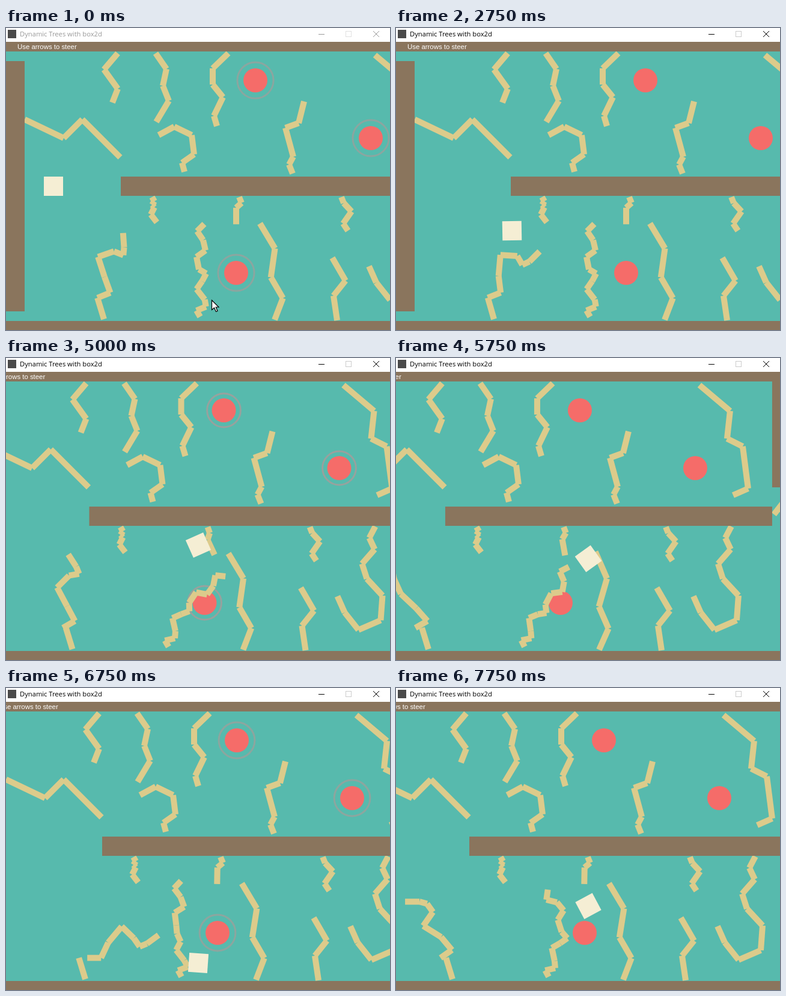
Recreate the animation shown at these times as an HTML page with a canvas. Size 639 px wide and 502 px high, loop 8000 ms.

```html
<!DOCTYPE html>
<html lang="en">
<head>
<meta charset="utf-8">
<title>Dynamic Trees with box2d</title>
<style>
html, body { margin: 0; width: 100%; height: 100%; overflow: hidden; background: #57baad; }
canvas { display: block; }
</style>
</head>
<body>
<canvas id="stage" width="639" height="502"></canvas>
<script>
const ctx = document.getElementById('stage').getContext('2d');
const W = 639, H = 502, LOOP = 8000, STEP = 250;
const TEAL = '#57baad', BROWN = '#8a755d', WOOD = '#dccb8b', RED = '#f56c69', CREAM = '#f5eed4';
const mix = (a, b, u) => a + (b - a) * u;

// Trees at rest: joints as x, y pairs.
const upper = [
  [31, 152, 96, 183, 127, 152, 190, 215],
  [186, 42, 163, 69, 186, 101, 177, 124],
  [249, 42, 267, 68, 261, 96, 271, 121, 250, 156],
  [370, 42, 344, 67, 344, 94, 361, 115, 346, 146, 351, 163],
  [254, 178, 280, 164, 309, 178, 313, 210, 293, 224, 297, 239],
  [496, 122, 487, 158, 465, 166, 478, 214, 471, 227, 477, 242],
  [614, 45, 665, 88, 660, 134, 686, 147, 695, 217, 670, 228]
];
const lower = [
  [243, 281, 247, 288, 243, 294, 247, 298, 241, 310, 251, 323],
  [558, 281, 562, 291, 575, 305, 561, 325, 569, 337],
  [543, 382, 565, 420, 545, 445, 551, 486],
  [667, 280, 657, 299, 666, 318, 645, 342, 653, 367, 679, 395, 676, 436, 639, 452, 616, 423, 604, 396],
  [738, 260, 752, 242, 767, 234]
];

// Swinging trees: root, branch lengths, then poses of time, root slip and branch angles.
const leftTree = {
  x: 163, y: 484, lens: [37, 23, 28, 35, 28, 17, 13, 24],
  poses: [
    [2000, 0, -107, -22, -110, -108, -19, 22, -85, -94],
    [2750, 0, -106, -22, -97, -85, 4, 60, -25, -45],
    [4000, 0, -106, -13, -84, -70, 20, 65, -23, -34],
    [5000, -5, -107, -30, -118, -118, -45, -10, -112, -123],
    [6250, -14, -107, -30, -139, -147, -152, -150, -130, -140],
    [6750, 14, -107, 0, -65, -50, 44, 55, -22, -36],
    [7750, -9, -107, -35, -130, -148, -55, -125, -165, -180]
  ]
};
const midTree = {
  x: 323, y: 480, lens: [12, 17, 12, 22, 16, 14.5, 14, 21, 18.5, 17.5, 18, 17],
  poses: [
    [4000, 0, -120, -22, -100, -128, -55, -62, -150, -101, -36, -103, -124, -45],
    [5000, 0, -120, -13, -86, -103, -24, -20, -92, -56, 11, -54, -79, 6],
    [6250, 0, -114, -10, -100, -95, -22, -3, -100, -66, -18, -94, -132, -45],
    [6750, 0, -118, -20, -118, -128, -62, -115, -95, -97, -32, -110, -127, -47],
    [7750, 0, -118, -13, -95, -102, -30, -35, -132, -108, -58, -130, -166, -82]
  ]
};
const rightTree = {
  x: 447, y: 485, lens: [38.5, 40, 48.5, 48.5],
  poses: [
    [5250, 0, -69, -120, -82, -121],
    [6250, 0, -63, -107, -66, -106],
    [6750, 0, -69, -120, -81, -121]
  ]
};
const hanging = {
  x: 388, y: 281, lens: [10.5, 12, 27.5],
  poses: [
    [4250, 0, 68, 138, 90],
    [5000, 0, 70, 108, 65],
    [6250, 0, 68, 128, 88],
    [6750, 0, 68, 140, 91]
  ]
};

// Box: time, x, y, angle in degrees.
const path = [
  [1000, 79, 263, 0],
  [1500, 68, 272, 0],
  [2250, 112, 340, 0],
  [2750, 193, 337, -1],
  [4000, 290.5, 389, -8],
  [5000, 372.5, 311, -24],
  [6250, 447, 365.5, -47],
  [6750, 351, 457, -86],
  [7750, 389, 362.5, -118]
];

function span(keys, t) {
  const last = keys.length - 1;
  if (t <= keys[0][0]) return [0, 0, 0];
  if (t >= keys[last][0]) return [last, last, 0];
  const i = keys.findIndex(k => k[0] > t) - 1;
  return [i, i + 1, (t - keys[i][0]) / (keys[i + 1][0] - keys[i][0])];
}

// Cubic through the keys, with flat tangents at turning points.
function curve(keys, t, c) {
  const [i, j, u] = span(keys, t);
  if (i === j) return keys[i][c];
  const rate = k => (keys[k + 1][c] - keys[k][c]) / (keys[k + 1][0] - keys[k][0]);
  const slope = k => {
    if (k === 0 || k === keys.length - 1) return 0;
    const a = rate(k - 1), b = rate(k);
    return a * b > 0 ? 2 * a * b / (a + b) : 0;
  };
  const d = keys[j][0] - keys[i][0], v = 1 - u;
  return keys[i][c] * (1 + 2 * u) * v * v + slope(i) * d * u * v * v
       + keys[j][c] * u * u * (3 - 2 * u) - slope(j) * d * u * u * v;
}

function rect(color, x, y, w, h) {
  ctx.fillStyle = color;
  ctx.fillRect(x, y, w, h);
}

function line(x1, y1, x2, y2) {
  ctx.beginPath();
  ctx.moveTo(x1, y1);
  ctx.lineTo(x2, y2);
  ctx.stroke();
}

function disc(x, y, r) {
  ctx.beginPath();
  ctx.arc(x, y, r, 0, 2 * Math.PI);
}

function restTree(p) {
  for (let k = 0; k < p.length - 2; k += 2) line(p[k], p[k + 1], p[k + 2], p[k + 3]);
}

function swingTree({ x, y, lens, poses }, t) {
  const [i, j, u] = span(poses, t);
  const s = u * u * (3 - 2 * u);
  const at = c => mix(poses[i][c], poses[j][c], s);
  lens.forEach((len, k) => {
    const a = at(k + 2) * Math.PI / 180;
    const nx = x + len * Math.cos(a), ny = y + len * Math.sin(a);
    line(x, y, nx, ny);
    x = k ? nx : nx + at(1);
    y = ny;
  });
}

function drawTarget(x, y, t) {
  const age = t < 1250 ? t + 560 : (t + 360) % 1640;
  const r = 20 + age * 0.018;
  ctx.fillStyle = RED;
  disc(x, y, 20);
  ctx.fill();
  if (r > 39.2) return;
  ctx.globalAlpha = 0.75 * (1 - (r - 20) / 20);
  ctx.strokeStyle = '#e2858a';
  ctx.lineWidth = 3;
  disc(x, y, r);
  ctx.stroke();
  ctx.globalAlpha = 1;
}

function drawWorld(t) {
  const x = curve(path, t, 1), y = curve(path, t, 2);
  rect(TEAL, 0, 0, W, H);
  ctx.save();
  ctx.translate(-Math.max(0, x - 320), 0);
  drawTarget(415, 87, t);
  drawTarget(607, 183, t);
  drawTarget(383, 407, t);
  ctx.strokeStyle = WOOD;
  ctx.lineWidth = 10;
  upper.forEach(restTree);
  lower.forEach(restTree);
  for (const tree of [leftTree, midTree, rightTree, hanging]) swingTree(tree, t);
  rect(BROWN, 0, 23, 1000, 16);
  rect(BROWN, 0, 487, 1000, 15);
  rect(BROWN, 0, 55, 31, 416);
  rect(BROWN, 191, 247, 544, 32);
  rect(BROWN, 735, 39, 16, 176);
  ctx.fillStyle = '#fff';
  ctx.font = '11.4px "Liberation Sans", Arial, sans-serif';
  ctx.fillText('Use arrows to steer', 19, 35);
  ctx.translate(x, y);
  ctx.rotate(curve(path, t, 3) * Math.PI / 180);
  rect(CREAM, -16, -16, 32, 32);
  ctx.restore();
}

function drawTitleBar(active) {
  const ink = active ? '#000' : '#999';
  rect('#fff', 0, 0, W, 23);
  rect('#4a4a4a', 3, 3, 14, 14);
  ctx.fillStyle = ink;
  ctx.font = '11.2px "Open Sans", "Noto Sans", sans-serif';
  ctx.fillText('Dynamic Trees with box2d', 23, 14);
  rect(ink, 520, 10, 10, 1);
  ctx.lineWidth = 1;
  ctx.strokeStyle = active ? '#ccc' : '#e0e0e0';
  ctx.strokeRect(565.5, 5.5, 9, 9);
  ctx.strokeStyle = ink;
  line(611, 5, 621, 15);
  line(621, 5, 611, 15);
}

function drawCursor() {
  const arrow = new Path2D('M342.5 452.5v16l4-3.5 3 6.5 2.5-1-2.8-6.5h4.8z');
  ctx.fillStyle = '#fff';
  ctx.fill(arrow);
  ctx.strokeStyle = '#000';
  ctx.lineWidth = 1.2;
  ctx.stroke(arrow);
}

let start;
function frame(now) {
  if (start === undefined) start = now;
  const t = Math.floor((now - start) % LOOP / STEP) * STEP;
  drawWorld(t);
  drawTitleBar(t >= 250);
  if (t < 500) drawCursor();
  requestAnimationFrame(frame);
}
requestAnimationFrame(frame);
</script>
</body>
</html>
```
